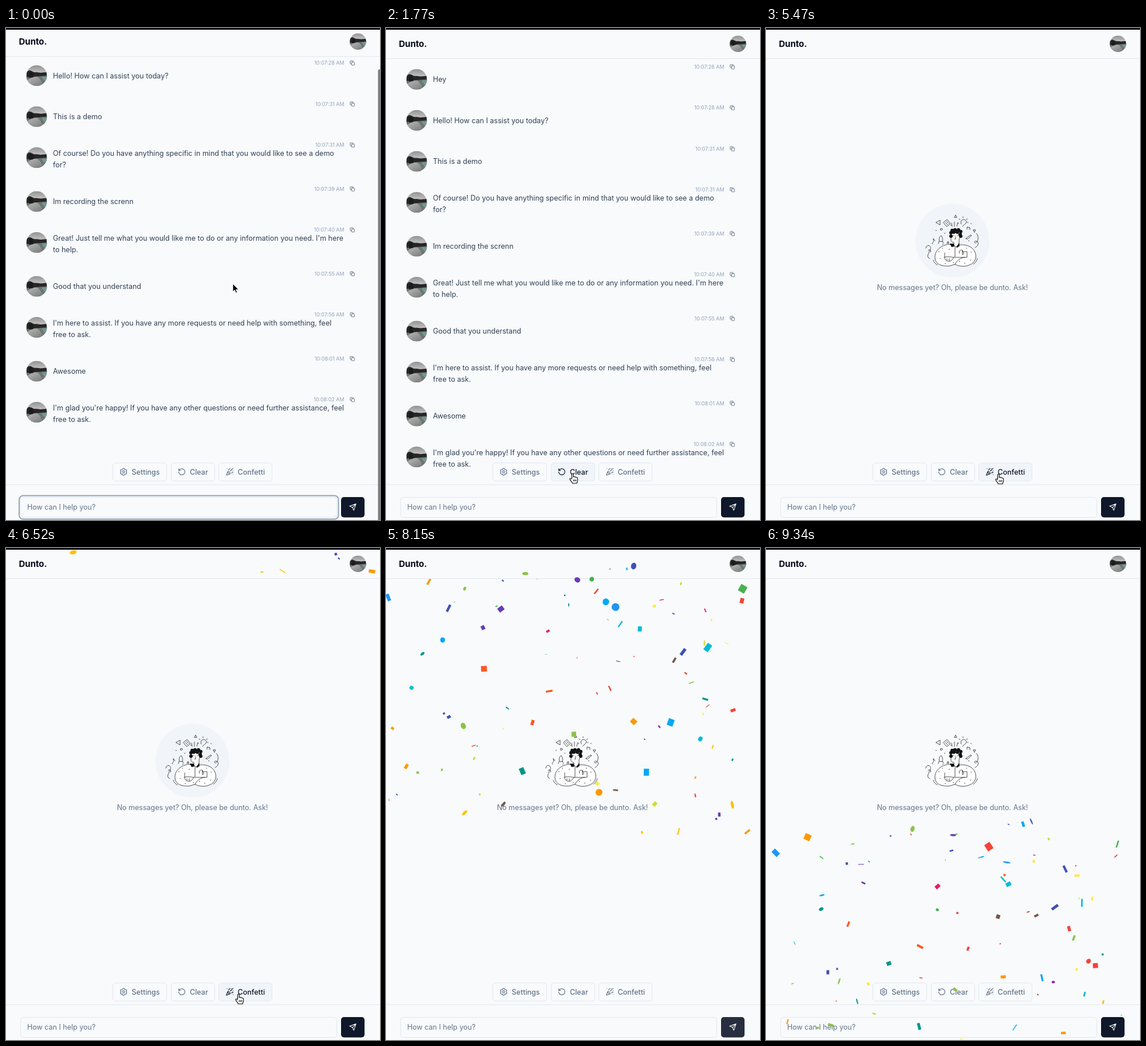
An HTML page for the animation above (9440 ms loop, 653 px wide and 858 px high).

```html
<!DOCTYPE html>
<html lang="en">
<head>
<meta charset="utf-8">
<title>Chat demo</title>
<style>
html, body { margin: 0; width: 100%; height: 100%; overflow: hidden; background: #f8fafc; }
svg { display: block; font: 12.5px Inter, sans-serif; }
.line { fill: none; stroke: currentColor; stroke-width: 2; stroke-linecap: round; stroke-linejoin: round; }
.box { stroke: #e2e8f0; fill: #f8fafc; }
.muted { fill: #64748b; }
.ink { fill: #0f172a; }
.medium { font-weight: 500; }
.time { font-size: 8.93px; fill: #94a3b8; text-anchor: end; }
.button { color: #64748b; }
.button text { fill: currentColor; font-weight: 500; }
.button.hover { color: #0f172a; }
.button.hover rect { fill: #f1f5f9; }
.panel { fill: #fff; stroke: #e2e8f0; filter: drop-shadow(0 2px 2px #0003); }
.doodle { fill: none; stroke: #222; stroke-width: .8; stroke-linejoin: round; stroke-linecap: round; }
</style>
</head>
<body>
<svg id="stage" width="653" height="858" viewBox="0 0 653 858"></svg>
<script>
const LOOP = 9440, STEP = 148.25;
const stage = document.getElementById('stage');
const $ = id => document.getElementById(id);
const show = (id, on) => $(id).setAttribute('display', on ? 'inline' : 'none');
const move = (id, x, y) => $(id).setAttribute('transform', `translate(${x} ${y})`);

// Text is placed by the vertical centre of its capitals.
const text = (x, cy, str, cls = '', extra = '') =>
  `<text x="${x}" y="${cy + 4.5}" class="${cls}" ${extra}>${str}</text>`;
const rect = (x, y, w, h, cls, r = 5, extra = '') =>
  `<rect x="${x}" y="${y}" width="${w}" height="${h}" rx="${r}" class="${cls}" ${extra}/>`;
const icon = (cx, cy, size, body, cls = 'line') =>
  `<g class="${cls}" transform="translate(${cx} ${cy}) scale(${size / 24}) translate(-12 -12)">${body}</g>`;
const avatar = (cx, cy, scale = 1) =>
  `<use href="#avatar" transform="translate(${cx} ${cy}) scale(${scale})"/>`;

const gearPoints = [];
for (let i = 0; i < 6; i++)
  for (const [offset, r] of [[-24, 7.6], [-12, 10], [12, 10], [24, 7.6]]) {
    const a = (i * 60 + 90 + offset) * Math.PI / 180;
    gearPoints.push(`${(12 + r * Math.cos(a)).toFixed(2)},${(12 + r * Math.sin(a)).toFixed(2)}`);
  }
const icons = {
  gear: `<polygon points="${gearPoints.join(' ')}"/><circle cx="12" cy="12" r="3"/>`,
  undo: '<path d="M3 12a9 9 0 1 0 9-9 9.75 9.75 0 0 0-6.74 2.74L3 8M3 3v5h5"/>',
  party: '<path d="M5.8 11.3 2 22l10.7-3.8M4 3h.01M22 8h.01M15 2h.01M22 20h.01M22 2l-2.2.8a2.9 2.9 0 0 0-2 3.1c.1.9-.5 1.6-1.4 1.6h-.4c-.9 0-1.6.6-1.8 1.5L14 10M22 13l-.8-.3c-.9-.4-1.8.2-2 1.1-.1.7-.7 1.2-1.4 1.2H17M11 2l.3.8c.4.9-.2 1.8-1.1 2C9.5 4.9 9 5.5 9 6.2V7M11 13c1.9 1.9 2.8 4.2 2 5s-3.1-.1-5-2-2.8-4.2-2-5 3.1.1 5 2Z"/>',
  send: '<path d="M22 2 11 13M22 2l-7 20-4-9-9-4Z"/>',
  copy: '<rect x="8" y="8" width="14" height="14" rx="2"/><path d="M16 8V4a2 2 0 0 0-2-2H4a2 2 0 0 0-2 2v10a2 2 0 0 0 2 2h4"/>',
  check: '<path d="M20 6 9 17l-5-5"/>',
  down: '<path d="m6 9 6 6 6-6"/>'
};

const messages = [
  ['07:26', 'Hey'],
  ['07:28', 'Hello! How can I assist you today?'],
  ['07:31', 'This is a demo'],
  ['07:31', 'Of course! Do you have anything specific in mind that you would like to see a demo', 'for?'],
  ['07:39', 'Im recording the screnn'],
  ['07:40', "Great! Just tell me what you would like me to do or any information you need. I'm here", 'to help.'],
  ['07:55', 'Good that you understand'],
  ['07:56', "I'm here to assist. If you have any more requests or need help with something, feel", 'free to ask.'],
  ['08:01', 'Awesome'],
  ['08:02', "I'm glad you're happy! If you have any other questions or need further assistance, feel", 'free to ask.']
];
let rowY = 67.5;
const rows = messages.map(([time, first, second]) => {
  const y = rowY;
  rowY += second ? 76.5 : 71.5;
  return `<text x="590.5" y="${y + 3.3}" class="time">10:${time} AM</text>` +
    icon(604.7, y, 9, icons.copy) + avatar(53.5, y + 22) +
    (second ? text(82, y + 14, first) + text(82, y + 34.5, second) : text(82, y + 22, first));
}).join('');

const buttons = [
  { x: 186.5, w: 94, iconX: 205.3, textX: 219.5, label: 'Settings', icon: 'gear' },
  { x: 288.5, w: 76, iconX: 307, textX: 321, label: 'Clear', icon: 'undo' },
  { x: 371.5, w: 93, iconX: 390.7, textX: 404.5, label: 'Confetti', icon: 'party' }
];
const buttonMarkup = buttons.map((b, i) =>
  `<g id="button${i}" class="button">${rect(b.x, 758.5, b.w, 31.5, 'box')}` +
  icon(b.iconX, 774, 14.3, icons[b.icon]) + text(b.textX, 774, b.label) + '</g>').join('');

const curls = [[323, 357], [325, 353], [330, 352], [336, 352], [340, 355], [339, 360], [334, 356], [328, 356], [340, 363], [323, 363]]
  .map(([x, y]) => `<circle cx="${x}" cy="${y}" r="3"/>`).join('');
const dots = [[302, 390], [308, 384], [304, 402], [320, 386], [313, 411], [327, 409], [338, 407], [350, 384], [358, 391], [357, 405], [347, 410], [297, 353], [312, 358], [323, 344], [358, 341], [336, 341], [309, 377], [354, 371]]
  .map(([x, y]) => `<circle cx="${x}" cy="${y}" r=".7"/>`).join('');
const illustration = `
  <circle id="disc" cx="325.5" cy="371" r="64.5" fill="#f1f5f9"/>
  <g class="doodle">
    <path fill="#fff" d="M323 377C304 377 294 390 295 401c1 12 13 15 26 14l9-3c6 4 17 5 26 1 10-4 13-15 8-24-4-7-12-11-23-11Z"/>
    <path fill="#fff" d="M323 359v12q2 3 5 3v5l4 3 5-4v-9l3-8-7-4Z"/>
    <path d="M331 363v5h-2M326 362h2M334 362h2M330 382v17M312 392v8M311 400c6-2 11-1 16 0h24v-10h-8M312 401c1 7 10 8 14 2l2-3M316 402v3M320 402v4M343 387v8M338 393c-3-4 3-8 5-4s4 5 0 6M347 400c-7 0-14 6-17 12"/>
    <path d="M297 339l7-4v8ZM310 339l6-5 6 7-6 5ZM313 339l4 4M315 337l4 4M329 330l2-4 2 4ZM362 352l4 0-2 4ZM341 342c-3-6 3-10 7-7s0 7-2 8l-3 3M337 333l2 1M344 329v2M352 333l-2 1M353 339h-2M349 367l8-6 2 1-7 6ZM351 351v-4l5 1v4M303 372c-2-6 1-9 3-10 2 3 3 6 2 10ZM302 372l-1 4M308 372l2 3M291 377c-4-4 4 0 1-10l3 4M316 375l2-3 1 3ZM325 346l-1-6M329 346v-8M333 346l2-7M279 384c1-9 11-4 8 2s-8 15-1 16M283 388c3-3 6 0 4 3M367 358c6 4 3 16-1 17-4 0-2-5 2-3 5 3 2 8-3 11M292 405q2 6 7 8M369 402q-1 6-7 10"/>
    <circle cx="306" cy="351" r="1.7"/>
  </g>
  <g fill="#111">${curls}${dots}<path d="M321 376l7 0 1 5-5 1ZM332 382l5-7 1 5-4 3Z"/></g>`;

stage.innerHTML = `
  <defs>
    <clipPath id="round"><circle r="18"/></clipPath>
    <linearGradient id="sky" x2="0" y2="1"><stop stop-color="#929292"/><stop offset=".5" stop-color="#d4d4d4"/></linearGradient>
    <linearGradient id="stone" x2="1" y2="1"><stop stop-color="#b9bbb9"/><stop offset="1" stop-color="#777b79"/></linearGradient>
    <g id="avatar" clip-path="url(#round)">
      <path fill="url(#sky)" d="M-18-18h36v36h-36Z"/>
      <path fill="#262626" d="M-18-5q4-6 9-3t8 2l8 1 11-1v8l-17 2-19 3Z"/>
      <path fill="#6f7472" d="M-18 3 18 0v18h-36Z"/>
      <path fill="url(#stone)" d="M-18 10Q-9 1 1 2q8 5 9 16h-28Z"/>
      <path fill="#6f9b91" d="M9 2h9v8q-6 0-9-8Z"/>
      <path fill="#1b1b1b" d="M-13 4q-2-11 3-11t4 10Z"/>
    </g>
  </defs>
  <path fill="#f8fafc" d="M0 0h653v858H0Z"/>
  <g id="rows" fill="#334155" color="#475569">${rows}</g>
  <g id="empty">${illustration}${text(325.5, 452, 'No messages yet? Oh, please be dunto. Ask!', 'muted', 'text-anchor="middle"')}</g>
  <g id="header">
    <path fill="#f8fafc" d="M0 0h653v53H0Z"/><path stroke="#e2e8f0" d="M0 53.5h653"/>
    <text x="22.5" y="33" font-size="15" font-weight="700" fill="#020617">Dunto.</text>
    ${avatar(614.5, 27.5, .795)}
  </g>
  <path fill="#0c0218" d="M0 0h653v3H0Z"/>
  <path fill="#f8fafc" d="M0 796h653v62H0Z"/><path stroke="#e2e8f0" d="M0 796.5h653"/>
  ${buttonMarkup}
  ${rect(25.5, 818.5, 552, 35, 'box')}
  ${rect(23, 815.5, 557.5, 41, '', 7, 'id="ring" fill="none" stroke="#94a3b8" stroke-width="2"')}
  ${text(37, 835.5, 'How can I help you?', 'muted')}
  ${rect(585, 818, 41, 35.5, '', 5, 'id="send"')}
  <g color="#f8fafc">${icon(605.5, 835.5, 13.5, icons.send)}</g>
  <path id="scrollbar" fill="#7b7d80" d="M649.5 858V75q0-3 3.5-3v786Z"/>
  <g id="popover">
    ${rect(91.5, 642.5, 285, 111.5, 'panel')}
    <text x="106" y="669" font-size="14.3" class="ink medium">Settings</text>
    ${text(106, 688, 'Set the settings for the chat.', 'muted')}
    ${text(106, 725, 'Model', 'ink medium')}
    ${rect(199, 709.5, 160.5, 31.5, 'box', 5, 'style="fill:#fff"')}
    ${text(210, 725, 'ZQM 4', 'ink', 'id="model"')}
    <g color="#848c99">${icon(340.5, 725, 14.3, icons.down)}</g>
  </g>
  <g id="menu">
    ${rect(199.5, 745.5, 161, 65, 'panel')}
    ${rect(203, 0, 154, 28.5, '', 3, 'id="highlight" fill="#f1f5f9"')}
    ${text(232, 763.5, 'ZQM 3.5 Swift', 'ink')}${text(232, 792, 'ZQM 4', 'ink')}
    <g color="#0f172a">${icon(216.5, 791.5, 14.3, icons.check)}</g>
  </g>
  <g id="confetti"></g>
  <g id="pointer" stroke-linejoin="round">
    <path id="arrow" fill="#000" stroke="#fff" d="M0 0v14l3.2-3 2.3 5 2.2-1-2.2-4.8H10Z"/>
    <path id="hand" fill="#fff" stroke="#000" stroke-width="1.1" d="M-1.5 9V1.3C-1.5-.4 1.2-.4 1.2 1.3V6C1.5 5 3.5 5 3.8 6.3 4.3 5.6 6 5.8 6.2 7 7 6.5 8.5 7 8.5 8.3V12c0 2-1 3-1.3 5H-.5C-1 15-4 12-5 10-5.6 8.6-3.6 7.8-2.6 9.3ZM1.3 10.5v3M3.5 10.5v3M5.7 10.5v3"/>
  </g>`;

// Confetti
let seed = 11;
const random = () => (seed = seed * 16807 % 2147483647) / 2147483647;
const between = (a, b) => a + (b - a) * random();
const colors = ('#f44336 #e91e63 #9c27b0 #673ab7 #3f51b5 #2196f3 #03a9f4 #00bcd4 #009688 ' +
  '#4caf50 #8bc34a #cddc39 #ffeb3b #ffc107 #ff9800 #ff5722 #795548').split(' ');
const pieces = Array.from({ length: 95 }, () => {
  const shape = Math.floor(random() * 3), w = between(4, 15), h = between(4, 15);
  const el = document.createElementNS(stage.namespaceURI, shape ? 'rect' : 'ellipse');
  const width = shape === 2 ? w / 3 : w;
  const attributes = shape ? { x: -width / 2, y: -h / 2, width, height: h } : { rx: w / 2, ry: w / 2 };
  for (const name in attributes) el.setAttribute(name, attributes[name]);
  el.setAttribute('fill', colors[Math.floor(random() * colors.length)]);
  $('confetti').append(el);
  return {
    el, x: between(0, 653), start: -490 * random() ** .8, drift: between(-30, 30),
    angle: between(0, 360), spin: between(-200, 200), flip: random()
  };
});

function drawConfetti(time) {
  const t = (time - 5740) / 1000;
  show('confetti', t > 0);
  if (t <= 0) return;
  const fall = 100 * t * t * (1 - .02 * t * t);
  for (const p of pieces) {
    const flip = Math.abs((p.flip + t * 3) % 1 * 2 - 1);
    p.el.setAttribute('transform',
      `translate(${p.x + p.drift * (t - 2.4)} ${p.start + fall}) rotate(${p.angle + p.spin * t}) scale(1 ${.1 + .9 * flip})`);
  }
}

// Pointer stops: time, x, y
const stops = [
  [0, 396, 446], [140, 396, 446], [1040, 345, 735], [1480, 326, 777], [2080, 326, 777],
  [2500, 236, 777], [2750, 236, 777], [3200, 265, 728], [3560, 256, 739], [3860, 270, 765],
  [4200, 270, 765], [4700, 430, 720], [5180, 432, 775], [5450, 406, 778], [7650, 406, 778],
  [7860, 540, 800], [8010, 604, 835], [8140, 615, 880], [LOOP, 615, 880]
];
const smooth = u => u * u * (3 - 2 * u);
const progress = (t, from, to) => smooth(Math.min(1, Math.max(0, (t - from) / (to - from))));

function pointerAt(t) {
  const i = Math.max(1, stops.findIndex(s => s[0] >= t));
  const [t0, x0, y0] = stops[i - 1], [t1, x1, y1] = stops[i];
  const u = progress(t, t0, t1);
  return [x0 + (x1 - x0) * u, y0 + (y1 - y0) * u];
}

function draw(t) {
  const [x, y] = pointerAt(t);
  const settingsOpen = t > 2650 && t < 4600;
  const menuOpen = t > 3250 && t < 4140;
  const cleared = t > 2060;

  move('rows', 0, -78 * (1 - progress(t, 0, 900)));
  move('header', 0, -4 * (1 - progress(t, 0, 400)));
  $('scrollbar').setAttribute('opacity', 1 - progress(t, 700, 1040));
  show('rows', !cleared);
  show('empty', cleared);
  show('disc', t < 7900);
  show('ring', t < 1470);
  show('popover', settingsOpen);
  show('menu', menuOpen);
  $('highlight').setAttribute('y', t > 3700 ? 749.5 : 777.5);
  $('model').textContent = t > 4140 ? 'ZQM 3.5 Swift' : 'ZQM 4';
  $('send').setAttribute('fill', t > 8000 && t < 8250 ? '#272e3f' : '#0f172a');

  let overButton = x > 585 && x < 626 && y > 818 && y < 853;
  buttons.forEach((b, i) => {
    const hover = !settingsOpen && x > b.x && x < b.x + b.w && y > 758 && y < 790;
    $('button' + i).classList.toggle('hover', hover);
    overButton ||= hover;
  });
  show('hand', overButton);
  show('arrow', !overButton);
  move('pointer', x, y);
  drawConfetti(t);
}

function tick() {
  const t = performance.now() % LOOP;
  draw(Math.min(63, Math.floor((t + 18) / STEP)) * STEP);
  requestAnimationFrame(tick);
}
tick();
</script>
</body>
</html>
```
